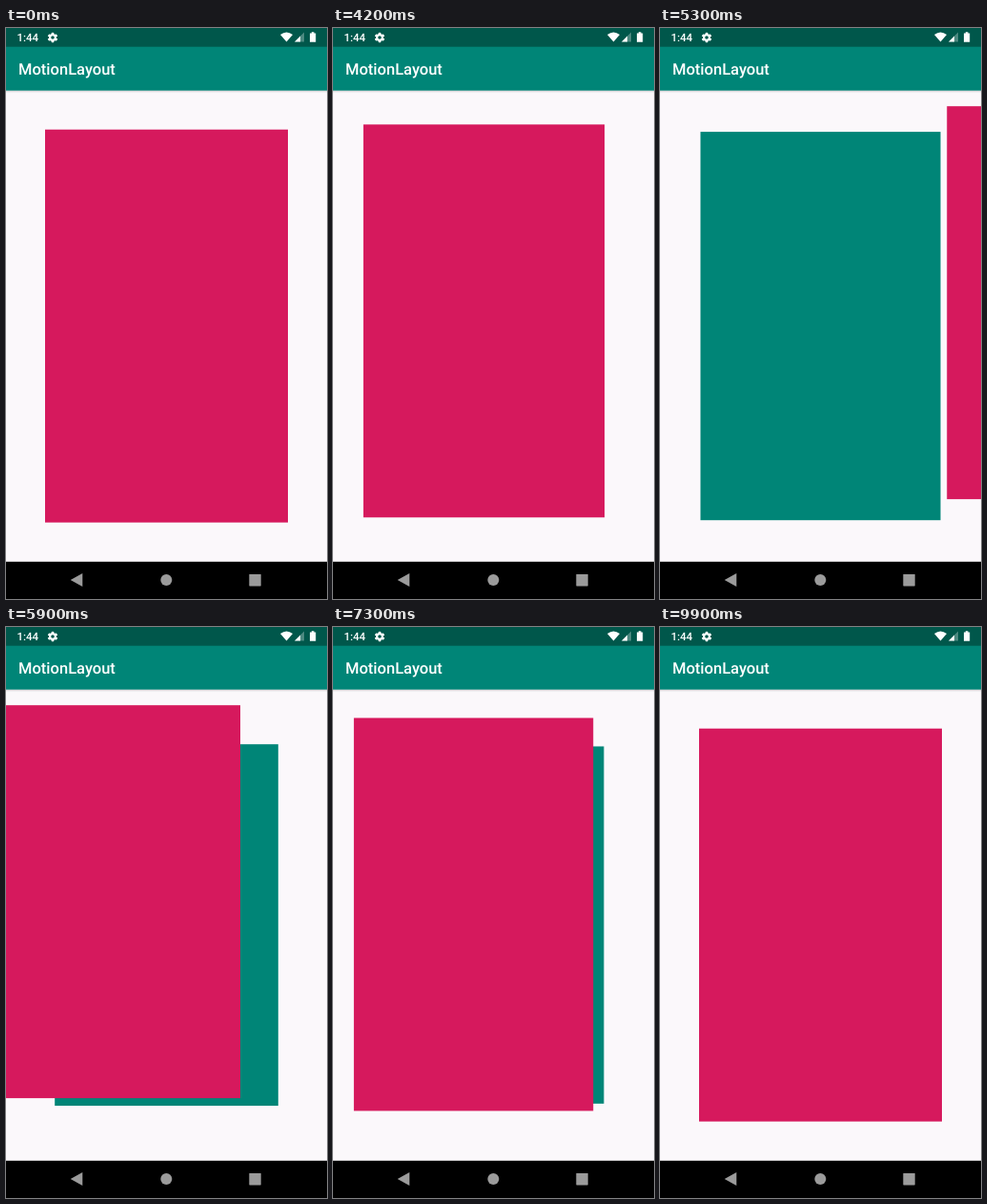
An HTML page that plays this animation: 337x600 px, repeating every 10000 ms.

```html
<!DOCTYPE html>
<html lang="en">
<head>
<meta charset="utf-8">
<title>MotionLayout</title>
<style>
  html, body { margin: 0; width: 100%; height: 100%; overflow: hidden; background: #fbf8fb; }
  svg { display: block; }
  text { font-family: Roboto, sans-serif; font-weight: 500; fill: #fff; text-rendering: geometricPrecision; }
</style>
</head>
<body>
<svg width="337" height="600" viewBox="0 0 337 600">
  <defs>
    <linearGradient id="shade" x2="0" y2="1">
      <stop stop-color="#000" stop-opacity=".2"/>
      <stop offset="1" stop-color="#000" stop-opacity="0"/>
    </linearGradient>
  </defs>
  <rect width="337" height="600" fill="#fbf8fb"/>
  <rect id="bottomCard" fill="#008577"/>
  <rect id="topCard" fill="#d6195d"/>

  <rect y="65.5" width="337" height="2.5" fill="url(#shade)"/>
  <rect y="19" width="337" height="46.7" fill="#008577"/>
  <rect width="337" height="19.7" fill="#00574b"/>
  <text x="13" y="49" font-size="16.5">MotionLayout</text>
  <text x="11.4" y="14" font-size="11.5">1:44</text>

  <g fill="#fff">
    <g fill="none" stroke="#fff">
      <circle cx="49" cy="10" r="2.9" stroke-width="2.2"/>
      <circle cx="49" cy="10" r="4.4" stroke-width="1.8" pathLength="12" stroke-dasharray="1.1 .9" stroke-dashoffset="-.45"/>
    </g>
    <path d="M288 7.1Q294.5 1.8 301 7.1L294.5 14.5Z"/>
    <path d="M303 14.5L313 4.5V14.5Z" opacity=".3"/>
    <path d="M303 14.5L309 8.5V14.5Z"/>
    <path d="M319 5.4H320.8V4.2H323.4V5.4H325.2V14.8H319Z"/>
  </g>

  <rect y="560.8" width="337" height="39.2"/>
  <g fill="#9b9b9b">
    <path d="M67.7 580L80.3 573V587Z"/>
    <circle cx="168.3" cy="580" r="6"/>
    <rect x="255.3" y="574" width="12.4" height="12.4" rx=".6"/>
  </g>
</svg>
<script>
const LOOP = 10000, STEP = 100, STAGE = 337;
const REACH = 200, EXIT = 117, RESET = 210; // ms to drag fully, to leave, and until the next card
const rest = { left: 41, right: 296, top: 106.7, height: 412.9 };

// side: where the card leaves; a long swipe first visits the other side
const swipes = [
  { start: 3000, release: 4380, side: -1 },
  { start: 5000, release: 5200, side: 1 },
  { start: 5700, release: 5900, side: -1 },
  { start: 6385, release: 7380, side: -1 }
];

const easeOut = k => 1 - (1 - k) ** 2;

// 0 is rest, ±1 a full drag, ±2 off screen; negative is left
function swipeAt(ms) {
  const swipe = swipes.find(({ start, release }) => ms >= start && ms < release + RESET);
  if (!swipe) return 0;
  const { start, release, side } = swipe, time = ms - start, length = release - start;
  if (time >= length) return side * (1 + Math.min(1, (time - length) / EXIT));
  if (time < REACH) return (length > REACH ? -side : side) * easeOut(time / REACH);
  return side * (2 * ((time - REACH) / (length - REACH)) ** 3 - 1);
}

function place(id, x, y, width, height) {
  const card = document.getElementById(id);
  Object.entries({ x, y, width, height }).forEach(([name, value]) => card.setAttribute(name, value));
}

function draw(now) {
  const ms = Math.floor(now % LOOP / STEP) * STEP;
  const swipe = swipeAt(ms), side = Math.sign(swipe);
  const drag = Math.min(Math.abs(swipe), 1), exit = Math.abs(swipe) - drag;

  // The trailing edge travels further than the leading one, so the card narrows
  const left = rest.left + drag * (side > 0 ? 50 : -42);
  const right = rest.right + drag * (side > 0 ? 42 : -50);
  const shift = exit * (side > 0 ? STAGE - left : -right);
  place('topCard', left + shift, rest.top - 24.5 * drag, right - left, rest.height);

  const scale = .9 + .02 * drag + .08 * exit;
  const width = (rest.right - rest.left) * scale, height = rest.height * scale;
  place('bottomCard', STAGE / 2 - width / 2, rest.top + (rest.height - height) / 2, width, height);

  requestAnimationFrame(draw);
}
requestAnimationFrame(draw);
</script>
</body>
</html>
```
